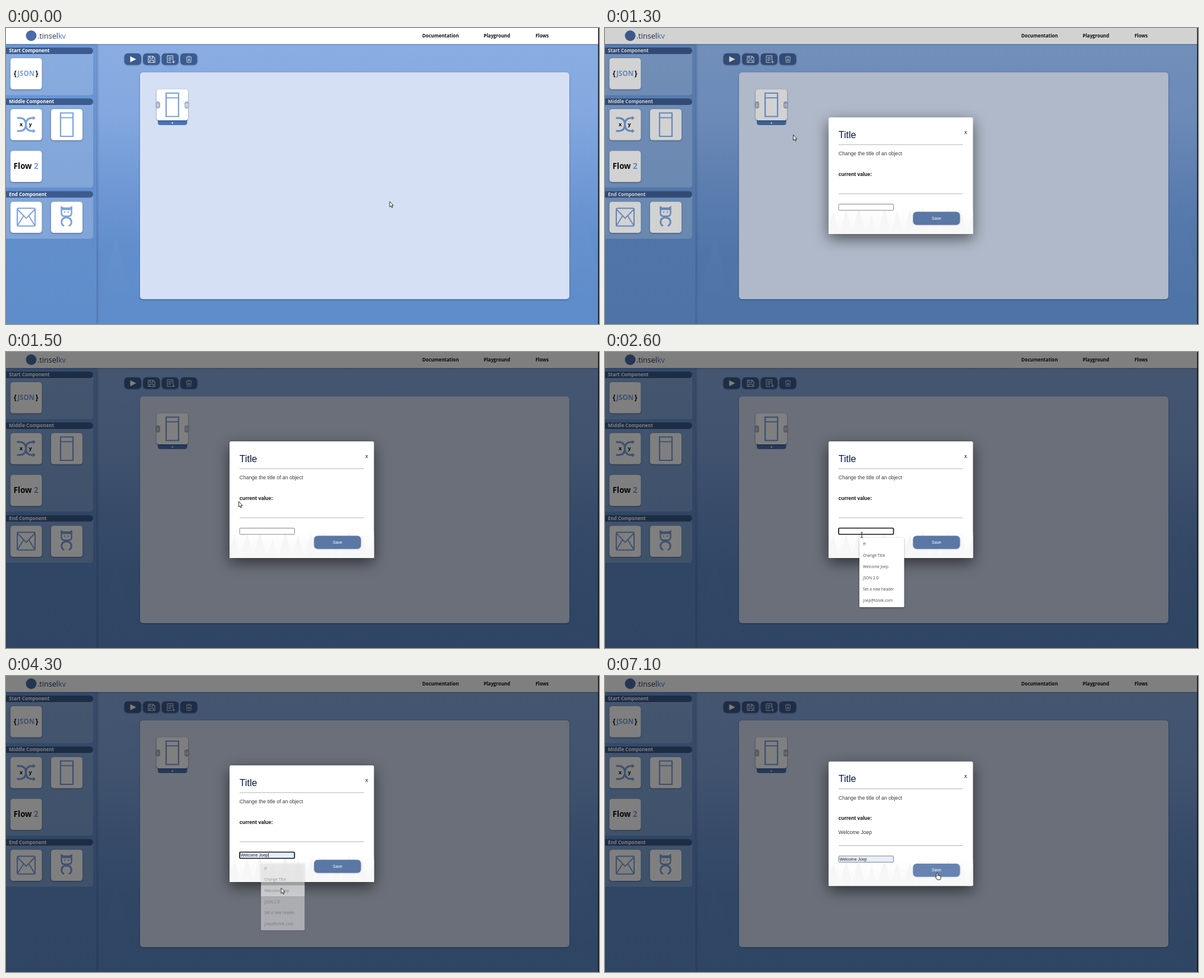
An HTML page with a canvas for the animation above (7300 ms loop, 1000 px wide and 500 px high).

```html
<!DOCTYPE html>
<html lang="en">
<head>
<meta charset="utf-8">
<title>Flow editor</title>
<style>
  html, body { margin: 0; width: 100%; height: 100%; overflow: hidden; background: #fff; }
  canvas { display: block; width: 1000px; height: 500px; }
</style>
</head>
<body>
<canvas id="stage"></canvas>
<script>
const LOOP = 7300, STEP = 100;
const BLUE = '#7ba2df', NAVY = '#3c5b8e';
const UI = '"Open Sans", "Noto Sans", sans-serif';
const ARIAL = '"Liberation Sans", Arial, sans-serif';
const GREETING = 'Welcome Joep';
const SUGGESTIONS = ['ff', 'Change Title', GREETING, 'JSON 2 D', 'Set a new header', 'joep@tolvik.com'];

// Moments of the story, in ms
const MODAL = 1100, FOCUS = 2300, LIST = 2400, HOVER = 3600, PICK = 4200, SAVE = 5300;

// Pointer path: time, x, y
const PATH = [
  [0, 647, 293], [700, 285, 159], [1000, 293, 170], [1300, 317.5, 180.5],
  [1500, 392.5, 252.5], [2000, 433, 304], [2600, 433, 309], [3000, 433, 312],
  [3600, 464, 358], [4400, 464, 358], [5000, 558.5, 323], [5600, 558.5, 323.5],
  [6800, 559.5, 332.5], [7300, 559.5, 332.5]
];

const canvas = document.getElementById('stage');
const dpr = window.devicePixelRatio || 1;
canvas.width = 1000 * dpr;
canvas.height = 500 * dpr;
const c = canvas.getContext('2d');

const clamp = v => Math.max(0, Math.min(1, v));
const smooth = v => v * v * (3 - 2 * v);

function rect(x, y, w, h, fill) {
  c.fillStyle = fill;
  c.fillRect(x, y, w, h);
}

function box(x, y, w, h, r, fill, stroke, lw = 1) {
  c.beginPath();
  c.roundRect(x, y, w, h, r);
  if (fill) { c.fillStyle = fill; c.fill(); }
  if (stroke) { c.strokeStyle = stroke; c.lineWidth = lw; c.stroke(); }
}

function line(d, color, lw, fill) {
  const p = new Path2D(d);
  if (fill) { c.fillStyle = fill; c.fill(p); }
  if (color) { c.strokeStyle = color; c.lineWidth = lw; c.stroke(p); }
}

function text(s, x, y, font, color, align = 'left') {
  c.font = font;
  c.fillStyle = color;
  c.textAlign = align;
  c.fillText(s, x, y);
}

function shadow(blur, dy, color, draw) {
  c.save();
  c.shadowBlur = blur * dpr;
  c.shadowOffsetY = dy * dpr;
  c.shadowColor = color;
  draw();
  c.restore();
}

function at(x, y, draw) {
  c.save();
  c.translate(x, y);
  draw();
  c.restore();
}

function gradient(y0, y1, ...colors) {
  const g = c.createLinearGradient(0, y0, 0, y1);
  colors.forEach((col, i) => g.addColorStop(i / (colors.length - 1), col));
  return g;
}

function tree(x, top, base, slope, fill) {
  const w = (base - top) * slope;
  c.fillStyle = fill;
  c.beginPath();
  c.moveTo(x, top);
  c.lineTo(x + w, base);
  c.lineTo(x - w, base);
  c.fill();
}

// Icons are drawn from the top left corner of a 53 px card
const icons = {
  json() {
    text('{', 5.5, 29.5, 'bold 12px ' + UI, '#111');
    text('JSON', 26.2, 30, 'bold 11.6px ' + UI, BLUE, 'center');
    text('}', 47, 29.5, 'bold 12px ' + UI, '#111', 'right');
  },
  swap() {
    line('M11 15h4C24 15 26 20 26 26S28 37 37 37h3M11 37h4C24 37 26 32 26 26S28 15 37 15h3', BLUE, 3);
    line('M38 11.5L42.5 15L38 18.5ZM38 33.5L42.5 37L38 40.5Z', null, 0, BLUE);
    text('x', 18, 28.5, 'bold 9px ' + UI, '#111', 'center');
    text('y', 33.5, 28.5, 'bold 9px ' + UI, '#111', 'center');
  },
  door() {
    line('M16 6.5h21v39.5h-21Z', BLUE, 2.2);
    line('M16 14.5h21', BLUE, 1.8);
  },
  flow() {
    text('Flow', 5.3, 30.5, 'bold 13.3px ' + UI, '#111');
    text('2', 39.5, 30.5, 'bold 13.3px ' + UI, BLUE);
  },
  mail() {
    box(11.5, 11, 30, 30, 2, null, BLUE, 2);
    line('M12 13L26.5 28L41 13M12 40L22 24M41 40L31 24', BLUE, 1.8);
  },
  robot() {
    line('M17.5 9L21 11h10L34.500 9V20Q34 24.500 29 24.500H23Q18 24.500 17.500 20Z', BLUE, 2.4);
    rect(17, 10, 18, 4, BLUE);
    rect(22, 16.5, 2, 2, BLUE);
    rect(28, 16.5, 2, 2, BLUE);
    line('M22 41C15.500 38 16 27 26 26.500C36 27 36.500 38 30 41', BLUE, 3);
  }
};

function card(x, y, icon) {
  shadow(3, 1, 'rgba(30,50,90,.5)', () => box(x, y, 53, 52.5, 4.5, '#fff'));
  at(x, y, icons[icon]);
}

function group(y, h, title) {
  box(0, y, 147, h, [0, 5, 5, 0], 'rgba(255,255,255,.2)');
  box(0, y, 147, 11, [0, 6, 6, 0], NAVY);
  text(title, 5, y + 8.4, 'bold 8px ' + UI, '#fff');
}

function toolbar() {
  const glyphs = [
    () => line('M10 5L20 10L10 15Z', null, 0, '#fff'),
    () => {
      line('M9 5h8l3 3v7.500h-11ZM11.500 5v3.500h5v-3.500M11.500 15.500v-4h6v4', '#dfe7f4', 1.1);
    },
    () => line('M9.500 4h9.500v8M9.500 4v11.500h7M11.500 7h5.500M11.500 9.500h5.500M11.500 12h4M17.500 14.500h5M20 12v5', '#dfe7f4', 1),
    () => line('M9.500 6.500h10M12.500 6.500v-1.500h4v1.500M10.500 6.500l.7 9h6.600l.7-9M13 9v4.500M14.500 9v4.500M16 9v4.500', '#b5c4de', 1)
  ];
  glyphs.forEach((glyph, i) => at(199.5 + i * 31.5, 42.8, () => {
    shadow(2, 1, 'rgba(30,50,90,.4)', () => box(0, 0, 28.5, 19.5, 6, NAVY));
    glyph();
  }));
}

function node() {
  box(256, 152, 49.5, 12, 4, '#4a74b3');
  text('+', 280.5, 162.8, 'bold 7px ' + UI, '#fff', 'center');
  card(254, 103.5, 'door');
  [['I', 252], ['O', 301]].forEach(([label, x]) => {
    box(x, 124, 8, 12, 3.5, '#a9b5cb');
    text(label, x + 4, 132.6, 'bold 7px ' + UI, '#f2f5fa', 'center');
  });
}

function page() {
  rect(0, 0, 1000, 500, gradient(27, 500, '#8aade2', '#83a8df', '#7099d5', '#608dcb', '#5f8cca'));
  const treeFill = gradient(280, 460, '#6b95d2', '#5f8cca');
  tree(185.500, 352, 460, 0.25, treeFill);
  tree(240, 330, 460, 0.24, treeFill);
  tree(969.500, 285, 470, 0.22, treeFill);
  tree(1010, 350, 470, 0.25, treeFill);

  shadow(5, 0, 'rgba(30,55,100,.55)', () => rect(0, 27, 152.500, 473, '#608ecc'));
  rect(0, 27, 152.500, 473, gradient(27, 500, '#6c98d6', '#638fcd', '#5f8cca'));
  group(33, 80.500, 'Start Component');
  group(119, 150.500, 'Middle Component');
  group(275.500, 80.500, 'End Component');
  card(7.500, 51, 'json');
  card(7.500, 137, 'swap');
  card(76, 137, 'door');
  card(7.500, 207.500, 'flow');
  card(7.500, 293.500, 'mail');
  card(76, 293.500, 'robot');

  toolbar();
  shadow(3, 1, 'rgba(40,65,110,.6)', () => box(226, 75, 724, 383, 5, '#d6e0f4'));
  node();

  shadow(3, 1, 'rgba(30,50,90,.3)', () => rect(0, 0, 1000, 27, '#fff'));
  c.fillStyle = '#4a6ca8';
  c.beginPath();
  c.arc(42.500, 13, 9, 0, 7);
  c.fill();
  const logoFont = '12.6px ' + UI;
  text('.tinsel', 53, 17.800, logoFont, '#26324a');
  text('kv', 53 + c.measureText('.tinsel').width, 17.800, logoFont, '#4d78bd');
  [['Documentation', 702], ['Playground', 805.500], ['Flows', 893]].forEach(
    ([s, x]) => text(s, x, 15.800, 'bold 7.9px ' + UI, '#111'));
}

function modal(t) {
  const saved = t >= SAVE, grow = saved ? 6.500 : 0;
  const focused = t >= FOCUS && !saved, filled = t >= HOVER;
  const top = 151 - grow, bottom = 348 + grow;

  shadow(24, 8, 'rgba(0,0,0,.55)', () => box(377, top, 243.500, bottom - top, 2.500, '#fff'));
  c.save();
  c.beginPath();
  c.rect(377, top, 243.500, bottom - top);
  c.clip();
  rect(377, bottom - 45, 243.500, 45, gradient(bottom - 45, bottom, '#fff', '#f8f8f9'));
  const pale = gradient(bottom - 50, bottom, '#f4f4f5', '#f8f8f9');
  for (let i = 0; i < 12; i++) {
    tree(385 + i * 21.500, bottom - 32 - 14 * Math.abs(Math.sin(i * 1.9 + 0.5)), bottom, 0.27, pale);
  }
  c.restore();

  at(0, -grow, () => {
    text('Title', 393.800, 185.800, '16px ' + ARIAL, '#0b1a48');
    text('x', 608.200, 178.800, 'bold 9px ' + ARIAL, '#555b66', 'center');
    rect(394, 196.500, 209.500, 1, '#b4b4b8');
    text('Change the title of an object', 393.800, 215.300, '8.6px ' + ARIAL, '#3c3c40');
    text('current value:', 393.800, 249.800, 'bold 8.5px ' + ARIAL, '#111');
    if (saved) text(GREETING, 393.800, 273.800, '8.5px ' + ARIAL, '#333');
  });

  at(0, grow, () => {
    rect(394, 279.500, 209.500, 1, '#b4b4b8');
    box(394, 297.500, 92.500, 10.500, 1.5, filled ? '#e6eefc' : '#fff',
      focused ? '#15171c' : '#77797e', focused ? 1.7 : 0.9);
    if (filled) {
      text(GREETING, 395.500, 305.200, '7px ' + ARIAL, '#222');
      if (focused) rect(396 + c.measureText(GREETING).width, 299, 0.8, 7.500, '#111');
    }
    const hot = t >= 5000;
    shadow(2, 0.5, 'rgba(40,60,100,.4)', () =>
      box(519.500, 310.500, 79, 22, 6, hot ? '#6683b1' : '#5a77a5'));
    text('Save', 559, 323.600, '7px ' + ARIAL, '#fff', 'center');
  });
}

function suggestions(t) {
  const out = clamp((t - PICK) / 200);
  if (t < LIST || out >= 1) return;
  c.save();
  c.globalAlpha = 1 - out;
  const k = 1 - 0.05 * out;
  c.translate(466.500, 372.500);
  c.scale(k, k);
  c.translate(-466.500, -372.500);
  shadow(3, 1, 'rgba(0,0,0,.35)', () => box(429, 314, 75.500, 117, 1.5, '#fff'));
  if (t >= HOVER) rect(429, 353, 75.500, 19, '#ececee');
  SUGGESTIONS.forEach((s, i) => text(s, 435, 326.800 + i * 19, '6.5px ' + UI, '#45474c'));
  c.restore();
}

function pointer(t) {
  const i = Math.max(1, PATH.findIndex(p => p[0] > t));
  const [t0, x0, y0] = PATH[i - 1], [t1, x1, y1] = PATH[i];
  const k = smooth((t - t0) / (t1 - t0));
  at(x0 + (x1 - x0) * k, y0 + (y1 - y0) * k, () => {
    c.lineJoin = 'round';
    if (t >= 2000 && t < 3100) {
      line('M-2 -4.500Q0 -4.500 0 -3V3Q0 4.500 -2 4.500M2 -4.500Q0 -4.500 0 -3M0 3Q0 4.500 2 4.500', '#222', 0.9);
    } else if (t >= 5000) {
      line('M-.7 .8Q.6 -.5 1.700 .8V4.600Q3 4 3.600 5Q5 4.500 5.500 5.600Q6.800 5.400 6.900 6.600V8.600L5.700 11.600H.8L-2 7.600Q-2 6 -.7 6.700Z', '#111', 0.9, '#fff');
    } else {
      line('M0 0V9.200L2.100 7.400L3.500 10.500L5 9.800L3.700 6.800H6.300Z', '#1a1a1a', 0.9, '#fff');
    }
  });
}

function draw(t) {
  c.setTransform(dpr, 0, 0, dpr, 0, 0);
  page();
  if (t >= MODAL) {
    const dim = 0.5 * Math.pow(clamp((t - 1060) / 440), 1.7);
    rect(0, 0, 1000, 500, `rgba(0,0,0,${dim})`);
    modal(t);
    suggestions(t);
  }
  rect(998.600, 0, 1.400, 500, '#0a0a0c');
  pointer(t);
}

const start = performance.now();
function tick() {
  const t = (performance.now() - start) % LOOP;
  draw(Math.floor(t / STEP) * STEP);
  requestAnimationFrame(tick);
}
tick();
</script>
</body>
</html>
```
